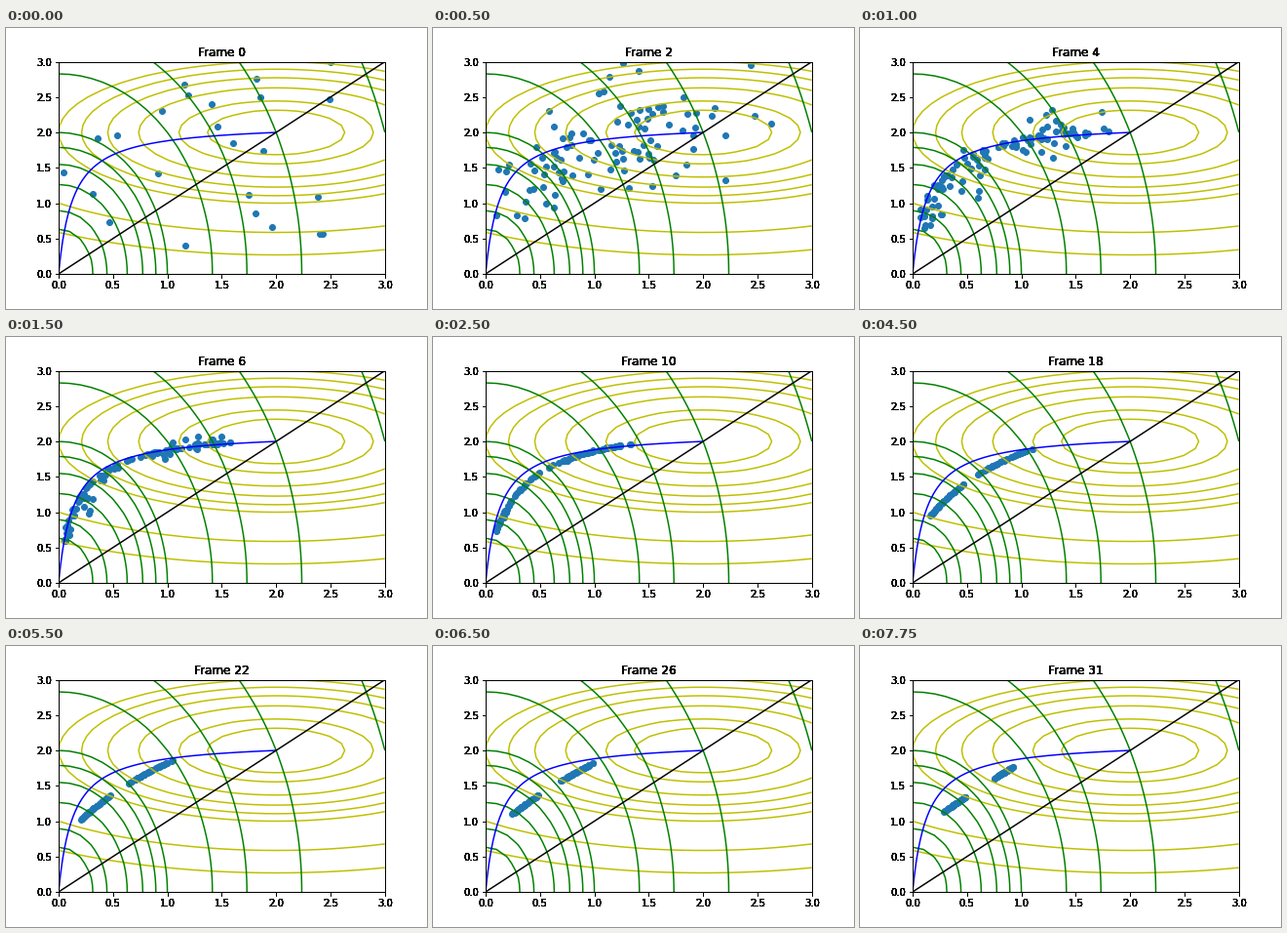
A matplotlib script for the animation above (8 s loop, 432 px wide and 288 px high).

```python
import numpy as np
import matplotlib.pyplot as plt
from matplotlib.animation import FuncAnimation

W, H, DPI = 432, 288, 72
FRAMES, INTERVAL = 32, 250
COUNT = 100
BOX = [0.125, 0.125, 0.775, 0.755]
LEVELS = [0.1, 0.2, 0.4, 0.6, 0.8, 1, 2, 3, 5, 10]
LABEL_LAYERS = 10

# Lower and upper end of the population's arc at some generations
GENERATIONS = [6, 10, 18, 26, 31]
LOW_X = [0.03, 0.095, 0.165, 0.245, 0.285]
LOW_Y = [0.56, 0.73, 0.95, 1.10, 1.13]
HIGH_X = [1.59, 1.345, 1.11, 0.99, 0.925]
HIGH_Y = [1.985, 1.965, 1.90, 1.82, 1.765]

rng = np.random.default_rng(4)
start = rng.uniform(0, 5, (COUNT, 2))
place = rng.random(COUNT)
decay = rng.uniform(0.3, 0.62, COUNT)


def arc(i):
    """Each member's place on the arc, which shrinks and straightens."""
    i = max(i, GENERATIONS[0])
    x0, y0, x1, y1 = (np.interp(i, GENERATIONS, ends)
                      for ends in (LOW_X, LOW_Y, HIGH_X, HIGH_Y))
    # Members drift from an even spread into two groups
    grouped = np.interp(place, [0, 0.59, 0.61, 1], [0, 0.33, 0.72, 1])
    s = ((i - 6) / 25) ** 2
    w = place ** 2 * (1 - s) + grouped * s
    bend = 0.16 * np.exp(0.165 * (i - 6))
    rise = w * (1 + bend) / (w + bend)
    return np.column_stack([x0 + (x1 - x0) * w, y0 + (y1 - y0) * rise])


def population(i):
    goal = arc(i)
    return goal + (start - goal) * (decay ** i)[:, None]


def add_axes(**kw):
    ax = fig.add_axes(BOX, **kw)
    ticks = np.arange(0, 3.1, 0.5)
    ax.set(xlim=(0, 3), ylim=(0, 3), xticks=ticks, yticks=ticks)
    return ax


plt.rcParams["font.family"] = "DejaVu Sans"
fig = plt.figure(figsize=(W / DPI, H / DPI), dpi=DPI, facecolor="white")
ax = add_axes()
# Repeated layers make the antialiased labels heavier
layers = [ax] + [add_axes(facecolor="none") for _ in range(LABEL_LAYERS)]

grid = np.linspace(0, 3, 31)
X, Y = np.meshgrid(grid, grid)
ax.contour(X, Y, (X - 2) ** 2 / 4 + (Y - 2) ** 2, LEVELS, colors="y")
ax.contour(X, Y, X ** 2 + Y ** 2 / 4, LEVELS, colors="g")
front = np.linspace(0, 2, 200)
ax.plot(front, 32 * front / (2 + 15 * front), "b")
ax.plot([0, 3], [0, 3], "k")
dots = ax.scatter([], [], color="C0")
titles = [layer.set_title("") for layer in layers]


def update(i):
    dots.set_offsets(population(i))
    for title in titles:
        title.set_text(f"Frame {i}")
    return [dots, *titles]


anim = FuncAnimation(fig, update, frames=FRAMES, interval=INTERVAL,
                     repeat=True, repeat_delay=0, blit=False)
plt.show()
```
